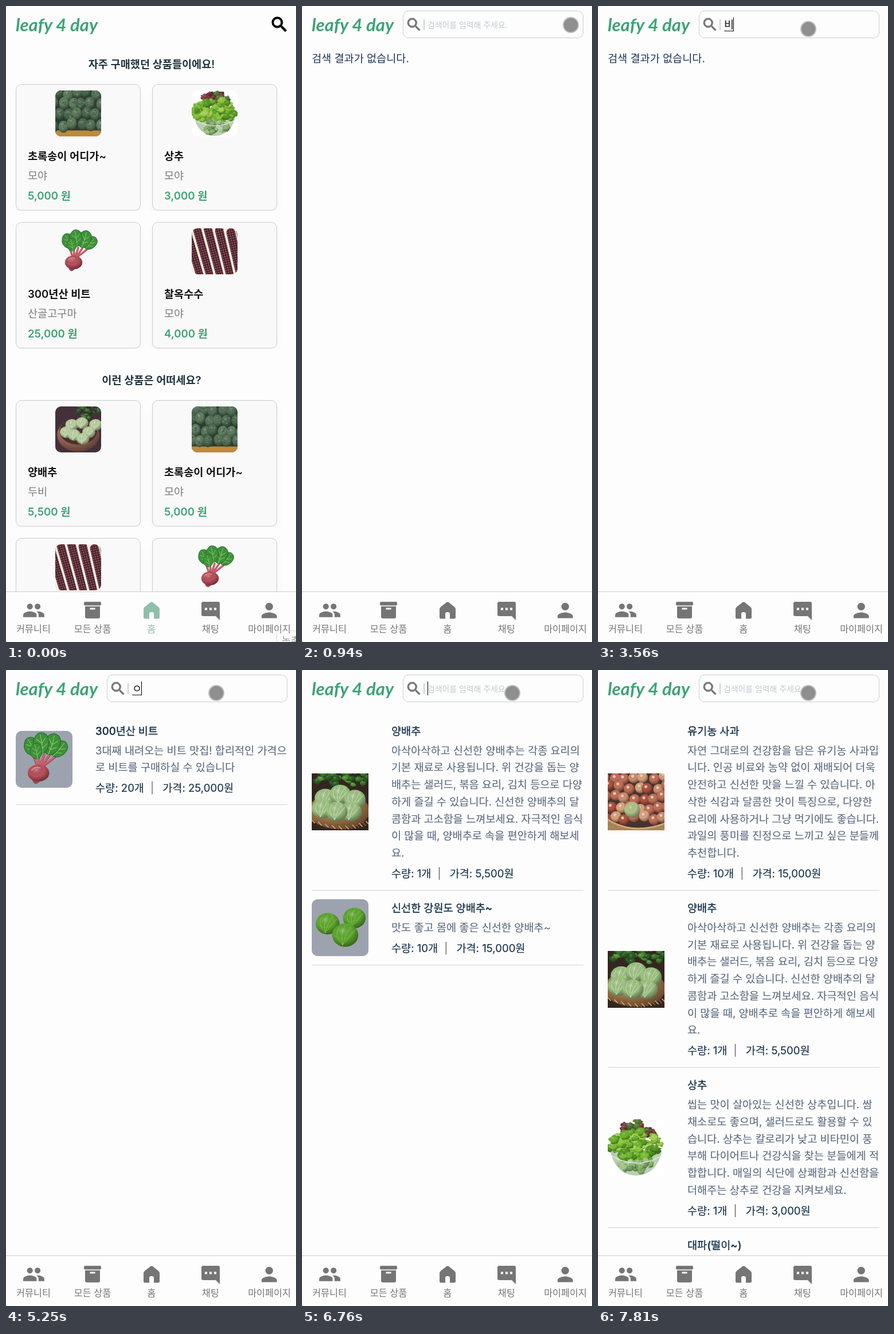
An HTML page for the animation above (8000 ms loop, 506 by 1107 pixels).

```html
<!DOCTYPE html>
<html lang="ko">
<head>
<meta charset="utf-8">
<style>
html, body { margin: 0; width: 100%; height: 100%; overflow: hidden; background: #fdfdfd; }
body { position: relative; font: 18.6px/30px Inter, "Noto Sans CJK KR", sans-serif; color: #16324a; }
body * { box-sizing: border-box; }
.abs { position: absolute; white-space: pre; }
.layer { position: absolute; inset: 0; }
.logo { left: 17px; top: 12px; font: italic 700 31px/40px Lato, sans-serif; color: #3fa276; }
h2 { position: absolute; margin: 0; left: 0; width: 508px; text-align: center; font-size: 18.6px; font-weight: 600; color: #20353f; }
.row { position: absolute; left: 17px; width: 474px; height: 220px; overflow: hidden; }
.card { position: absolute; top: 0; width: 218px; height: 220px; border: 1px solid #c9cbcb; border-radius: 10px; background: #f9f9f9; box-shadow: 0 12px 16px rgba(0,0,0,.035); }
.card svg { position: absolute; left: 68px; top: 10px; width: 80px; height: 80px; border-radius: 10px; }
.card p { position: absolute; margin: 0; left: 20px; white-space: pre; }
.name { top: 109px; color: #111; font-weight: 600; }
.seller { top: 143px; color: #7d7d7d; }
.price { top: 178px; color: #3ea474; font-weight: 600; }
.box { left: 176px; top: 8px; width: 315px; height: 48px; border: 1px solid #c6d0d0; border-radius: 10px; }
.bar { left: 212px; top: 23px; width: 2px; height: 19px; background: #ccd2d4; }
.hint { left: 219px; top: 18px; font-size: 13.9px; color: #c0cbd0; }
.input { left: 220px; top: 17px; color: #111; display: flex; }
.input u { text-decoration: none; height: 27px; border-bottom: 1px solid #111; }
.caret { width: 1px; height: 24px; background: #000; top: 20px; }
.results { position: absolute; left: 17px; top: 75.7px; width: 474px; }
.item { display: flex; align-items: center; gap: 40px; padding: 15px 0 14px; border-bottom: 1px solid #d0d3d5; white-space: pre; -webkit-text-stroke: .15px; }
.item svg { flex: none; width: 99px; height: 99px; }
.item .round { border-radius: 10px; background: #9ca3af; }
.item b { font-weight: 500; display: block; -webkit-text-stroke: .3px; }
.item p { margin: 5px 0; line-height: 29.75px; color: #5d6c80; }
.item i { font-style: normal; color: #777; margin: 0 15px 0 11px; }
nav { position: absolute; left: 0; top: 1019px; width: 100%; height: 88px; border-top: 1px solid #ccc; background: #fdfdfd; color: #757575; font-size: 16.3px; }
nav svg { position: absolute; left: 0; top: -1020px; width: 506px; height: 1107px; fill: currentColor; }
nav span { position: absolute; top: 49px; transform: translateX(-50%); white-space: pre; }
.tip { left: 472px; top: 1087px; width: 60px; height: 40px; border: 1px solid #ddd; padding: 2px 8px; color: #999; font-size: 17px; }
.pointer { width: 28px; height: 28px; margin: -14px; border-radius: 50%; border: 2.5px solid #bdbdbd; background: #8f8f8f; }
</style>
</head>
<body>
<svg width="0" height="0" style="position:absolute">
  <radialGradient id="shade" cx=".4" cy=".32" r=".7">
    <stop offset="0" stop-color="#fff" stop-opacity=".3"/>
    <stop offset=".5" stop-color="#000" stop-opacity="0"/>
    <stop offset="1" stop-color="#000" stop-opacity=".42"/>
  </radialGradient>
  <pattern id="kernel" width="5" height="5" patternUnits="userSpaceOnUse">
    <rect width="5" height="5" fill="#3f1a24"/><circle cx="2.5" cy="2.5" r="2" fill="#7a3d48"/><circle cx="2" cy="2" r=".8" fill="#d3a9ab"/>
  </pattern>
  <path id="lens" d="M15.5 14h-.79l-.28-.27C15.41 12.59 16 11.11 16 9.5 16 5.91 13.09 3 9.5 3S3 5.91 3 9.5 5.91 16 9.5 16c1.61 0 3.09-.59 4.23-1.57l.27.28v.79l5 4.99L20.49 19l-4.99-5zm-6 0C7.01 14 5 11.99 5 9.5S7.01 5 9.5 5 14 7.01 14 9.5 11.99 14 9.5 14z"/>
</svg>
<div class="layer" id="home">
  <svg class="abs" width="506" height="80"><use href="#lens" transform="translate(459.6 14.7) scale(1.45)" stroke="#000" stroke-width=".7"/></svg>
  <h2 style="top:86px">자주 구매했던 상품들이에요!</h2>
  <h2 style="top:636px">이런 상품은 어떠세요?</h2>
</div>
<div class="layer" id="search">
  <div class="abs box"></div>
  <svg class="abs" width="506" height="60"><use href="#lens" transform="translate(180.2 17.2) scale(1.27)" fill="#757575" stroke="#757575" stroke-width=".6"/></svg>
  <div class="abs bar"></div>
  <div class="abs hint">검색어를 입력해 주세요.</div>
  <div class="abs input"><span></span><u></u></div>
  <div class="abs caret"></div>
  <div class="abs" id="empty" style="left:17px;top:76px;color:#1d3358">검색 결과가 없습니다.</div>
</div>
<div class="abs logo">leafy 4 day</div>
<nav>
  <svg viewBox="0 0 506 1107">
    <path transform="translate(28.4 1032) scale(1.67)" d="M16 11c1.66 0 2.99-1.34 2.99-3S17.66 5 16 5s-3 1.34-3 3 1.34 3 3 3zm-8 0c1.66 0 2.99-1.34 2.99-3S9.66 5 8 5 5 6.34 5 8s1.34 3 3 3zm0 2c-2.33 0-7 1.17-7 3.5V19h14v-2.5c0-2.33-4.67-3.5-7-3.5zm8 0c-.29 0-.62.02-.97.05 1.16.84 1.97 1.97 1.97 3.45V19h6v-2.5c0-2.33-4.67-3.5-7-3.5z"/>
    <rect x="136" y="1037" width="30" height="6.5" rx="2"/>
    <path d="M138 1045h26v18q0 3-3 3h-20q-3 0-3-3zM146.5 1047.5v3h9v-3z" fill-rule="evenodd"/>
    <path id="house" d="M252 1038q2-1.5 4 0l10 8q2 1.5 2 4v14q0 2.5-2.5 2.5h-7.5v-8.5q0-3-3-3h-2q-3 0-3 3v8.5h-7.5q-2.5 0-2.5-2.5v-14q0-2.5 2-4z"/>
    <path d="M344 1037h26q3 0 3 3v29l-7-7h-22q-3 0-3-3v-19q0-3 3-3zM347 1047.5v4h4v-4zM355 1047.5v4h4v-4zM363 1047.5v4h4v-4z" fill-rule="evenodd"/>
    <path transform="translate(439.2 1032) scale(1.67)" d="M12 12c2.21 0 4-1.79 4-4s-1.79-4-4-4-4 1.79-4 4 1.79 4 4 4zm0 2c-2.67 0-8 1.34-8 4v2h16v-2c0-2.66-5.33-4-8-4z"/>
  </svg>
</nav>
<div class="abs tip">농촌</div>
<div class="abs pointer"></div>
<script>
const $ = q => document.querySelector(q);
let seed = 7;
const rnd = (a = 0, b = 1) => a + (b - a) * (seed = seed * 16807 % 2147483647) / 2147483647;
const pick = list => list[Math.floor(rnd() * list.length)];
const many = (n, fn) => Array.from({ length: n }, (_, i) => fn(i)).join('');
const rect = (c, y = 0) => `<rect y="${y}" width="100" height="100" fill="${c}"/>`;
const oval = (x, y, r, c, q = r) => `<ellipse cx="${x}" cy="${y}" rx="${r}" ry="${q}" fill="${c}"/>`;
const blob = (x, y, r, c, q = r) => oval(x, y, r, c, q) + oval(x, y, r, 'url(#shade)', q);
const line = (d, c, w) => `<path d="${d}" fill="none" stroke="${c}" stroke-width="${w}" stroke-linecap="round"/>`;
// ragged leaf edge
const frill = (x, y, r, c) => {
  const points = many(14, i => {
    const a = i * Math.PI / 7, d = r * rnd(.6, 1.15);
    return `${(x + d * Math.cos(a)).toFixed(1)},${(y + d * .8 * Math.sin(a)).toFixed(1)} `;
  });
  return [c, 'url(#shade)'].map(fill => `<polygon points="${points}" fill="${fill}"/>`).join('');
};
// shapes spread over an ellipse
const spread = (n, x, y, w, h, r, colors, shape = frill) => many(n, () => {
  const a = rnd(0, 6.283), d = Math.sqrt(rnd());
  return shape(x + w * d * Math.cos(a), y + h * d * Math.sin(a), rnd(r * .6, r), pick(colors));
});
const cabbage = (x, y, r, c, vein) => blob(x, y, r, c, r * .9) + [-.5, 0, .4, .8].map(k =>
  line(`M${x - r * .2} ${y + r * .75}Q${x + r * (k - .4)} ${y} ${x + r * k} ${y - r * (.75 - Math.abs(k) * .4)}`, vein, .7)).join('');
const leaf = (x, y, turn, size) => `<g transform="translate(${x} ${y}) rotate(${turn}) scale(${size})">
  <path d="M0 17C-13 15-17 0-11-9Q-5-19 2-18Q13-16 13-4C14 5 9 15 0 17Z" fill="#3d9139" stroke="#24642b"/>
  ${line('M0 17Q2 0 0-15M1 8L-8 1M1 8L9 2M1 0L-7-8M1 0L8-8', '#8cc765', 1.1)}</g>`;

const art = {
  broccoli: () => rect('#2c3b30') + rect('#c08a3c', 87) + many(28, i => {
    const r = Math.floor(i / 7), x = i % 7 * 20 + r % 2 * 10 - 12 + rnd(-3, 3), y = 6 + r * 23 + rnd(-4, 4);
    return blob(x, y, 11, pick(['#56735a', '#4b6950', '#607f60']), 13) + spread(7, x, y - 2, 8, 9, 3, ['#6a8668', '#4d6b4f', '#5d7b5c']);
  }),
  lettuce: () => rect('#fff') + '<path d="M4 55Q14 98 50 99Q86 98 96 55Z" fill="#b9cfb4"/>'
    + spread(30, 54, 17, 28, 14, 9, ['#6d3038', '#8a4340', '#4f7a32'])
    + spread(90, 50, 46, 45, 25, 11, ['#8ccd3a', '#6fb52c', '#a8da50', '#549a26', '#7cc433'])
    + spread(28, 50, 80, 31, 13, 9, ['#8bb86d', '#a8cd8e', '#769f63'])
    + line('M6 64Q50 90 95 64', '#dcebd8', 1.5),
  beet: () => [[26, 28], [40, 40], [50, 42], [63, 36], [76, 40]].map(([x, y]) =>
      line(`M40 68Q${(x + 44) / 2} 54 ${x} ${y}`, '#b6505c', 4.4) + line(`M40 66Q${(x + 44) / 2} 53 ${x} ${y}`, '#d9898c', 1)).join('')
    + leaf(76, 32, 42, .95) + leaf(28, 28, -26, .95) + leaf(63, 24, 18, 1.1) + leaf(45, 22, -8, 1.05) + leaf(36, 36, -12, .8)
    + '<path d="M28 82Q30 94 36 93Q41 92 44 86Z" fill="#a8434f"/>' + blob(40, 74, 19, '#bb515c', 15)
    + line('M28 69Q34 62 43 65', '#df8b8b', 2),
  corn: () => rect('#e3dfc6') + many(5, i => `<g transform="translate(${i * 25 - 26} ${i * 4 - 14}) rotate(${-17 + i})">
    <rect x="-5" y="-9" width="29" height="140" rx="9" fill="#f1eedd"/>${line('M22 10V125', '#8d985f', 2)}
    <rect width="19" height="130" rx="9" fill="url(#kernel)"/></g>`),
  bowl: () => rect('#44303a') + spread(26, 72, 10, 32, 14, 8, ['#31542b', '#477036', '#263f24'])
    + blob(50, 62, 46, '#a06a5a', 36) + oval(50, 54, 41, '#4a2f2b', 29)
    + [[36, 40], [58, 36], [88, 40], [24, 56], [73, 56], [41, 62], [60, 70]].map(([x, y]) => cabbage(x, y, 14, '#b9d0a0', '#e3edd0')).join(''),
  basket: () => rect('#33261f') + spread(40, 55, 8, 50, 15, 9, ['#3b7a2b', '#2a5a22', '#55953a'])
    + blob(48, 66, 54, '#a87a4c', 32) + many(18, i => line(`M${i * 6} ${82 + 11 * Math.sin(i / 5.5)}l5 5`, i % 2 ? '#7c5632' : '#c79a66', 2))
    + [[24, 44], [50, 37], [76, 46], [19, 62], [69, 67], [44, 67]].map(([x, y]) => cabbage(x, y, 19, '#9fc584', '#dfeccf')).join(''),
  sprouts: () => [[28, 43, 21], [75, 33, 20], [59, 63, 23]].map(([x, y, r]) =>
      cabbage(x, y, r, '#5faa2f', '#93cf5c')).join(''),
  apples: () => rect('#46332e') + many(35, i => {
    const r = Math.floor(i / 7), x = i % 7 * 17 + r % 2 * 8 - 4 + rnd(-3, 3), y = 6 + r * 18 + rnd(-4, 4);
    return blob(x, y, 9.5, pick(['#c4705a', '#b0523f', '#dba680', '#cf8f70'])) + oval(x - 2, y - 3, 2.5, '#eccbae');
  }) + blob(43, 64, 14, '#b5c48a')
    + '<path d="M0 80Q45 108 100 88V100H0Z" fill="#a98356"/>' + line('M0 81Q45 109 100 88', '#d0aa77', 3)
};
const pic = (kind, round) => `<svg viewBox="0 0 100 100"${round ? ' class="round"' : ''}>${art[kind]()}</svg>`;

const broccoli = ['broccoli', '초록송이 어디가~', '모야', '5,000'], beet = ['beet', '300년산 비트', '산골고구마', '25,000'],
  corn = ['corn', '찰옥수수', '모야', '4,000'], lettuce = ['lettuce', '상추', '모야', '3,000'], bowl = ['bowl', '양배추', '두비', '5,500'];
const card = ([kind, name, seller, price], i) => `<div class="card" style="left:${i * 238}px">${pic(kind)}
  <p class="name">${name}</p><p class="seller">${seller}</p><p class="price">${price} 원</p></div>`;
[[136, broccoli, lettuce], [376, beet, corn], [685.5, bowl, broccoli], [925.5, corn, beet]].forEach(([y, ...cards]) =>
  $('#home').insertAdjacentHTML('beforeend', `<div class="row" style="top:${y}px">${cards.map(card).join('')}</div>`));

const item = (kind, round, name, text, count, price) => `<div class="item">${pic(kind, round)}<div><b>${name}</b><p>${text}</p>수량: ${count}개<i>|</i>가격: ${price}원</div></div>`;
const cabbageItem = item('basket', false, '양배추', `아삭아삭하고 신선한 양배추는 각종 요리의
기본 재료로 사용됩니다. 위 건강을 돕는 양
배추는 샐러드, 볶음 요리, 김치 등으로 다양
하게 즐길 수 있습니다. 신선한 양배추의 달
콤함과 고소함을 느껴보세요. 자극적인 음식
이 많을 때, 양배추로 속을 편안하게 해보세
요.`, 1, '5,500');
const lists = [
  item('beet', true, '300년산 비트', '3대째 내려오는 비트 맛집! 합리적인 가격으\n로 비트를 구매하실 수 있습니다', 20, '25,000'),
  cabbageItem + item('sprouts', true, '신선한 강원도 양배추~', '맛도 좋고 몸에 좋은 신선한 양배추~', 10, '15,000'),
  item('apples', false, '유기농 사과', `자연 그대로의 건강함을 담은 유기농 사과입
니다. 인공 비료와 농약 없이 재배되어 더욱
안전하고 신선한 맛을 느낄 수 있습니다. 아
삭한 식감과 달콤한 맛이 특징으로, 다양한
요리에 사용하거나 그냥 먹기에도 좋습니다.
과일의 풍미를 진정으로 느끼고 싶은 분들께
추천합니다.`, 10, '15,000') + cabbageItem + item('lettuce', false, '상추', `씹는 맛이 살아있는 신선한 상추입니다. 쌈
채소로도 좋으며, 샐러드로도 활용할 수 있
습니다. 상추는 칼로리가 낮고 비타민이 풍
부해 다이어트나 건강식을 찾는 분들에게 적
합합니다. 매일의 식단에 상쾌함과 신선함을
더해주는 상추로 건강을 지켜보세요.`, 1, '3,000')
  + '<div class="item"><div style="margin-left:139px"><b>대파(떨이~)</b></div></div>'
].map(html => {
  const el = document.createElement('div');
  el.className = 'results';
  el.innerHTML = html;
  return $('#search').appendChild(el);
});

['커뮤니티', '모든 상품', '홈', '채팅', '마이페이지'].forEach((label, i) =>
  $('nav').insertAdjacentHTML('beforeend', `<span style="left:${48 + i * 102.9}px">${label}</span>`));
const homeLabel = document.querySelectorAll('nav span')[2];

// time, settled text, syllable being composed
const typing = [[0, '', ''],
  [3430, '', 'ㅂ'], [3560, '', '비'], [3690, '', '빝'], [3760, '비', '트'], [3880, '', ''],
  [5250, '', 'ㅇ'], [5310, '', '야'], [5380, '', '양'], [5520, '양', 'ㅂ'], [5580, '양', '배'], [5790, '양', '뱇'], [5860, '양배', '추'], [5970, '', ''],
  [6890, '', 'ㅅ'], [6970, '', '시'], [7050, '', '신'], [7130, '신', 'ㅅ'], [7210, '신', '서'], [7290, '신', '선'], [7420, '', '']];
const shown = [3880, 5970, 7420];
const caretOff = [[0, 1450], [1860, 2260], [2670, 3030], [4290, 4650], [5050, 5250], [6360, 6760], [7810, 8000]];
const path = [[30, 500, 1105], [150, 470, 850], [280, 400, 440], [380, 367, 190], [480, 404, 102], [620, 448, 48], [810, 469, 33],
  [940, 469, 33], [1150, 373, 47], [1310, 371, 45], [1450, 370, 44], [1750, 369, 42], [1860, 367, 40], [8000, 367, 40]];
const show = (el, on) => el.style.display = on ? '' : 'none';
const [settled, composing] = $('.input').children;

function draw(t) {
  const home = t < 910;
  show($('#home'), home);
  show($('#search'), !home);
  show($('.tip'), t < 30);
  $('#house').style.fill = homeLabel.style.color = home ? '#8fbfaa' : '';

  const [, done, part] = typing.findLast(k => k[0] <= t);
  settled.textContent = done;
  composing.textContent = part;
  show(composing, part);
  show($('.hint'), !part);
  show($('.caret'), !caretOff.some(([a, b]) => t >= a && t < b));
  if (!home) $('.caret').style.left = (part ? 220 + $('.input').offsetWidth - 1 : 219) + 'px';

  const current = shown.findLastIndex(s => s <= t);
  show($('#empty'), current < 0);
  lists.forEach((el, i) => show(el, i === current));

  const pointer = $('.pointer');
  show(pointer, t >= 30);
  const n = Math.max(1, path.findIndex(p => p[0] > t));
  const [a, b] = [path[n - 1], path[n]], f = Math.max(0, (t - a[0]) / (b[0] - a[0]));
  pointer.style.left = a[1] + (b[1] - a[1]) * f + 'px';
  pointer.style.top = a[2] + (b[2] - a[2]) * f + 'px';
}
const start = performance.now();
(function tick() {
  draw((performance.now() - start) % 8000);
  requestAnimationFrame(tick);
})();
</script>
</body>
</html>
```
